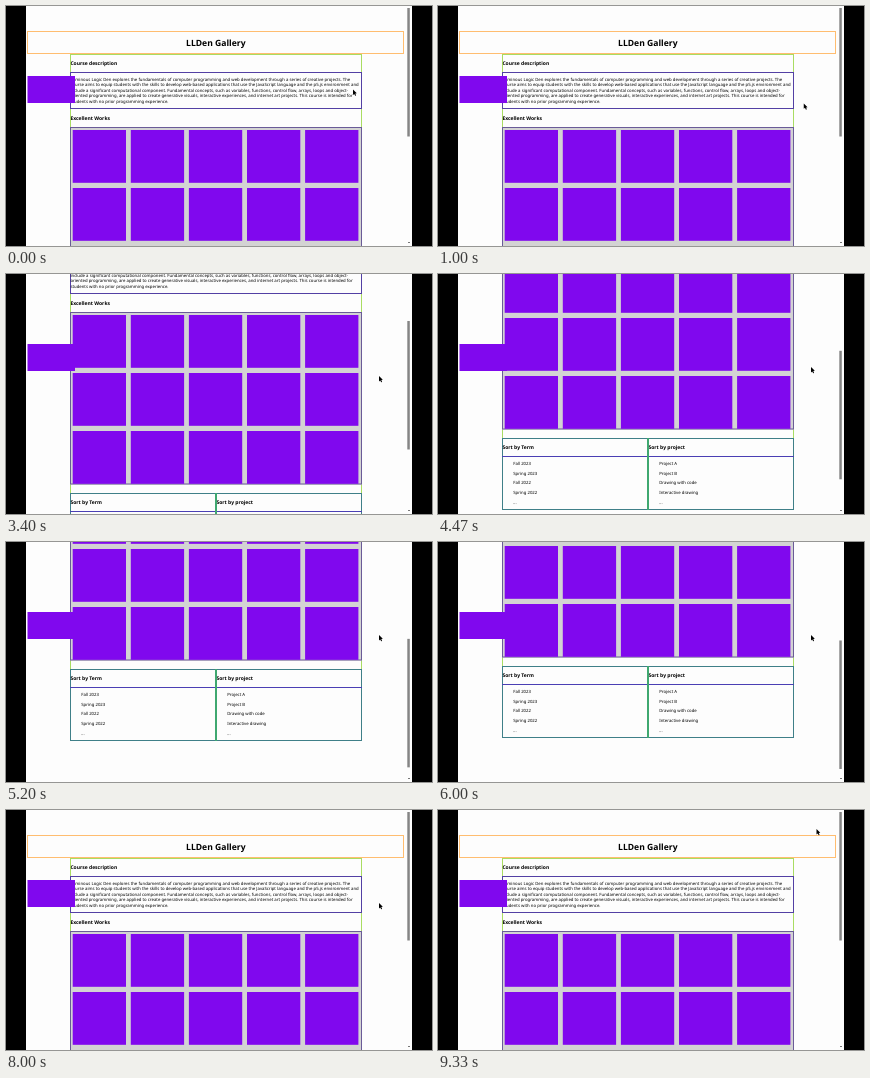
Animation of 426x240 px, one loop 9390 ms. Source, as an HTML page with a canvas:

```html
<!DOCTYPE html>
<html lang="en">
<head>
<meta charset="utf-8">
<title>Gallery</title>
<style>
  html, body { margin: 0; width: 100%; height: 100%; overflow: hidden; background: #000; }
  canvas { display: block; }
</style>
</head>
<body>
<canvas id="stage" width="426" height="240"></canvas>
<script>
const ctx = document.getElementById("stage").getContext("2d");
ctx.textRendering = "geometricPrecision";

const LOOP = 9390, STEP = 1000 / 15;
const EM = 4.29;
const PURPLE = "#8008ee";

const PARAGRAPH = [
  "Luminous Logic Den explores the fundamentals of computer programming and web development through a series of creative projects. The",
  "course aims to equip students with the skills to develop web-based applications that use the JavaScript language and the p5.js environment and",
  "include a significant computational component. Fundamental concepts, such as variables, functions, control flow, arrays, loops and object-",
  "oriented programming, are applied to create generative visuals, interactive experiences, and internet art projects. This course is intended for",
  "students with no prior programming experience."
];
const COLUMNS = [
  { x: 64.5, title: "Sort by Term", items: ["Fall 2023", "Spring 2023", "Fall 2022", "Spring 2022", "..."] },
  { x: 210.5, title: "Sort by project", items: ["Project A", "Project B", "Drawing with code", "Interactive drawing", "..."] }
];

// Keys are [time, value, ...]; values run straight between them.
const SCROLL = [[2050, 0], [3400, 83], [4470, 138], [5250, 178], [6250, 178], [7600, 0]];
const POINTER = [[100, 347, 83.5], [1300, 372, 102], [2400, 373, 102], [3400, 373, 102],
                 [4000, 373, 93], [8250, 373, 93], [9200, 378.5, 19]];

function track(keys, t) {
  const i = keys.findIndex(k => k[0] > t);
  if (i === 0) return keys[0].slice(1);
  if (i < 0) return keys[keys.length - 1].slice(1);
  const a = keys[i - 1], b = keys[i], u = (t - a[0]) / (b[0] - a[0]);
  return a.slice(1).map((v, n) => v + (b[n + 1] - v) * u);
}

function rect(x, y, w, h, color) {
  ctx.fillStyle = color;
  ctx.fillRect(x, y, w, h);
}

function box(x, y, right, bottom, color) {
  ctx.strokeStyle = color;
  ctx.strokeRect(x + .5, y + .5, right - x - 1, bottom - y - 1);
}

function text(str, x, y, size = 1, weight = 400, align = "left") {
  ctx.font = `${weight} ${EM * size}px "Noto Sans", "Open Sans", sans-serif`;
  ctx.textAlign = align;
  ctx.fillStyle = "#000";
  ctx.fillText(str, x, y);
}

const heading = (str, x, y) => text(str, x, y, 1.17, 700);

function drawPage() {
  box(21, 25, 398, 48, "#ffbd70");
  text("LLDen Gallery", 209.8, 39.6, 2, 700, "center");

  box(64, 48, 356, 374, "#a9dc62");
  heading("Course description", 64.4, 58.9);
  box(64, 66, 356, 103, "#5340a4");
  PARAGRAPH.forEach((line, i) => text(line, 64.4, 74.5 + i * 5.66));
  heading("Excellent Works", 64.4, 114.1);

  rect(64, 121, 292, 172.5, "#d3d3d3");
  box(64, 121, 356, 293.5, "#6a5b98");
  for (let row = 0; row < 3; row++)
    for (let col = 0; col < 5; col++)
      rect(66.7 + col * 58.1, 124 + row * 58, 53.3, 52.8, PURPLE);

  for (const { x, title, items } of COLUMNS) {
    box(x - .5, 302, x + 145.5, 374, "#3f7f88");
    rect(x - .5, 320, 146, 1, "#4a3fb4");
    heading(title, x, 313);
    items.forEach((item, i) => text(item, x + 10.7, 328.8 + i * 9.8));
  }
  rect(209, 302, 2, 72, "#3fa870");
}

function drawPointer(x, y) {
  ctx.fillStyle = "#000";
  ctx.beginPath();
  [[0, 0], [0, 5.4], [1.2, 4.4], [2.2, 6.3], [3.1, 5.9], [2.3, 4], [3.8, 3.8]]
    .forEach(([dx, dy]) => ctx.lineTo(x + dx, y + dy));
  ctx.fill();
}

function draw(t) {
  const scroll = Math.round(track(SCROLL, t)[0]);
  rect(0, 0, 426, 240, "#000");
  rect(20, 0, 386, 240, "#fdfdfd");

  ctx.save();
  ctx.translate(0, -scroll);
  drawPage();
  ctx.restore();

  rect(21.5, 70, 47.5, 27, PURPLE);
  rect(401.3, 2 + scroll * .542, 2.5, 128.5, "#858585");
  rect(402, 236, 2, 1, "#777");
  drawPointer(...track(POINTER, t));
}

function frame(now) {
  const t = now % LOOP;
  draw(Math.floor((t + 3.4) / STEP) * STEP);
  requestAnimationFrame(frame);
}
requestAnimationFrame(frame);
</script>
</body>
</html>
```
